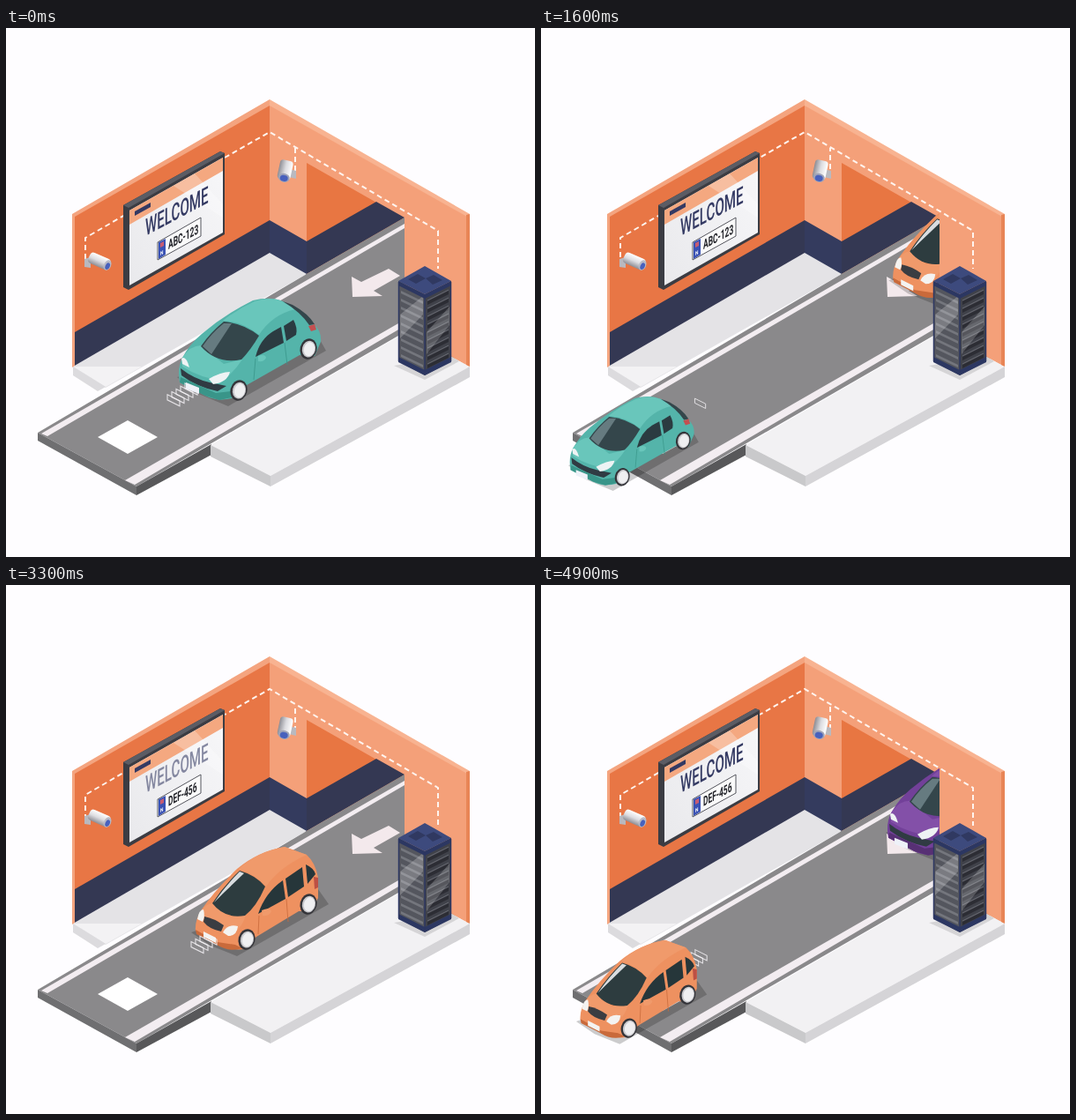
Write an HTML page that moves like this. It is 600x600 px and loops after 5000 ms.

```html
<!DOCTYPE html>
<html lang="en">
<head>
<meta charset="utf-8">
<title>Parking entrance</title>
<style>
  html, body { margin: 0; width: 100%; height: 100%; overflow: hidden; background: #fefdff; }
  svg { display: block; width: 100%; height: 100%; }
  text { font-family: Roboto, "Liberation Sans", sans-serif; }
  .wire { fill: none; stroke: #fff4ee; stroke-width: 2; stroke-dasharray: 6 4; }
</style>
</head>
<body>
<svg viewBox="0 0 600 600">
  <defs>
    <clipPath id="inside"><path d="M0 0H452V600H0Z"/></clipPath>
    <linearGradient id="glass" x1="0" x2="1" y1="1" y2="0"><stop offset="0" stop-color="#e9e9ec"/><stop offset="1" stop-color="#f7f7f9"/></linearGradient>
    <linearGradient id="tube" x1="0" y1="0" x2="0" y2="1"><stop offset="0" stop-color="#fff"/><stop offset=".5" stop-color="#dcdce0"/><stop offset="1" stop-color="#8d8d94"/></linearGradient>
  </defs>

  <g id="walls">
    <path fill="#e87645" d="M78 213L299 87V256L78 384Z"/>
    <path fill="#343853" d="M78 345L299 218V256L78 384Z"/>
    <path fill="#f4a079" d="M299 87L525 213V384L299 256Z"/>
    <path fill="#343b5e" d="M299 218L341 242V280L299 256Z"/>
    <path fill="#e87642" d="M341 153L452 216L341 278Z"/>
    <path fill="#343853" d="M341 242L420 197L452 215L341 279Z"/>
  </g>

  <g id="ground">
    <path fill="#e4e3e6" d="M76 384L299 255L341 279L113 408Z"/>
    <path fill="#f3f2f4" d="M76 384H154L113 407Z"/>
    <path fill="#dcdbde" d="M76 384L113 407L104 412L76 394Z"/>
    <path fill="#8a898b" d="M36 459L341 279L452 215V345L148 520Z"/>
    <path fill="#6f6f71" d="M36 459L148 520V530L36 468Z"/>
    <path fill="#58585a" d="M148 520L233 472V484L148 530Z"/>
    <path fill="#f3edf1" d="M40 460L452 222V227L47 463Z"/>
    <path fill="#f3edf1" d="M135 513L452 331V338L146 518Z"/>
    <path fill="#f2f1f3" d="M232 473L452 346L526 384L300 508Z"/>
    <path fill="#c9c9cb" d="M232 473L300 508V520L232 486Z"/>
    <path fill="#d5d4d7" d="M300 508L526 384V396L300 520Z"/>
    <path fill="#fff" d="M104 464L138 445L172 464L138 483Z"/>
    <path fill="#f3e9ec" d="M393 305L392 282L403 288L434 273L447 281L417 298L427 304Z"/>
  </g>

  <g id="trim">
    <path fill="#f4a47f" d="M75 211L299 81V88L78 214V383L75 385Z"/>
    <path fill="#f8b391" d="M299 81L526 211L523 214L299 88Z"/>
    <path fill="#e88556" d="M522 212L526 211V384L522 382Z"/>
  </g>

  <g id="wires">
    <path class="wire" d="M90 262V238L135 212"/>
    <path class="wire" d="M248 147L299 118L490 230V273"/>
    <path class="wire" d="M328 162V136"/>
  </g>

  <g id="screen">
    <path fill="#3b3c43" d="M133 201L243 140L248 142V234L139 297L133 294Z"/>
    <path fill="#5b5c64" d="M133 201L243 140L248 142L139 204Z"/>
    <path fill="url(#glass)" d="M140 207L246 147V232L140 292Z"/>
    <path fill="#f4a880" d="M140 207L246 147V162L140 223Z"/>
    <path fill="#fff" opacity=".25" d="M190 179L214 165L246 200V215Z"/>
    <path fill="#343a63" d="M146 208L164 198V203L146 213Z"/>
    <text id="hello" transform="matrix(.56 -.297 0 1 158 236)" font-size="27" font-weight="500" fill="#343a63">WELCOME</text>
    <g id="plate">
      <path fill="#fafafa" stroke="#55565e" stroke-width="1" d="M172 243L221 215V236L172 263Z"/>
      <path fill="#3a52b4" d="M173 243L181 239V257L173 262Z"/>
      <path fill="#c65b72" d="M175 244L179 242V247L175 249Z"/>
      <text transform="matrix(.8 -.42 0 1 175 258)" font-size="6" font-weight="700" fill="#fff">N</text>
      <text id="number" transform="matrix(.56 -.297 0 1 184 251)" font-size="15" font-weight="700" fill="#222329"></text>
    </g>
  </g>

  <g id="cameras">
    <path fill="#b9b9bf" d="M89 262L96 260V272L89 271Z"/>
    <g transform="translate(106 265) rotate(24)">
      <rect x="-13" y="-7" width="25" height="13" rx="4" fill="url(#tube)"/>
      <ellipse cx="10" cy="0" rx="4" ry="6" fill="#b8bac6"/>
      <ellipse cx="10.500" cy="1" rx="2.500" ry="4" fill="#4861bd"/>
    </g>
    <path fill="#b9b9bf" d="M321 160L329 162V171L321 169Z"/>
    <g transform="translate(317 162) rotate(102)">
      <rect x="-12" y="-7" width="22" height="15" rx="4" fill="url(#tube)"/>
      <ellipse cx="8" rx="5" ry="6.500" fill="#9da2b8"/>
      <ellipse cx="8.500" rx="3.500" ry="4.500" fill="#4861bd"/>
    </g>
  </g>

  <g id="cars" clip-path="url(#inside)"></g>
  <g id="rack"></g>
</svg>

<script>
const $ = id => document.getElementById(id);
const LOOP = 5000, STEP = 100;
const VX = -108.4, VY = 63.4;
const SHRINK = .6, PIVOT = [277, 385];
const shape = (d, fill, extra = '') => `<path d="${d}" fill="${fill}" ${extra}/>`;
const frac = x => x - Math.floor(x);
const ramp = (t, a, b) => Math.min(1, Math.max(0, (t - a) / (b - a)));

const wheel = (x, y) =>
  `<g transform="translate(${x} ${y}) rotate(14)"><ellipse rx="9.500" ry="11.800" fill="#343439"/>` +
  `<ellipse cx=".5" rx="7.500" ry="9.500" fill="#c9c9cd"/><ellipse cx="1" rx="6" ry="8" fill="#efeff1"/></g>`;

function hatch(c) {
  return shape('M194 396L216 414L252 429L363 366L354 350Z', '#000', 'opacity=".2"') +
    shape('M197 402Q194 386 200 374Q208 359 222 347Q248 325 280 309Q300 304 314 310Q336 320 350 337Q358 344 357 356L350 372L333 371L273 405L256 420Q240 424 226 417Z', c.side) +
    shape('M200 374Q209 360 221 360L247 381L268 376Q258 391 246 400Q220 397 200 384Z', c.top) +
    shape('M246 332Q262 319 282 310Q300 304 313 310L328 319Q302 325 287 348Q268 333 246 332Z', c.top) +
    shape('M221 361Q232 345 247 333Q270 335 287 349Q277 366 267 376Q240 382 221 361Z', '#34464b') +
    shape('M223 361Q233 346 247 335L256 335L233 370Z', '#667b80') +
    shape('M283 373Q288 353 303 344L312 339L315 357Z', '#2b3b41') +
    shape('M315 338L326 331Q331 340 329 348L318 355Z', '#2b3b41') +
    shape('M314 310L325 314Q343 324 350 336L344 337Q334 322 314 310Z', '#34464b') +
    shape('M343 338L350 336L352 342L346 344Z', '#c34f50') +
    shape('M286 372Q294 369 295 374Q293 379 286 378Z', c.top) +
    shape('M316 357L319 382M283 375L281 399', 'none', `stroke="${c.dark}" stroke-width=".8"`) +
    shape('M198 386Q213 398 231 402L250 406L240 412Q216 407 199 394Z', '#303b43') +
    shape('M199 375Q204 371 208 385L200 381Z', '#eef3f4') +
    shape('M230 398Q244 390 254 390Q251 402 235 404Z', '#eef3f4') +
    shape('M197 402L226 417L242 422L256 419L255 412L238 414L198 396Z', c.dark) +
    shape('M204 402L219 408V415L204 409Z', '#eef1f8') +
    wheel(264, 411) + wheel(343, 364);
}

function van(c) {
  return shape('M210 394L232 409L262 421L366 362L354 345Z', '#000', 'opacity=".2"') +
    shape('M215 392Q214 380 222 368Q236 347 262 322Q286 302 316 297L341 306Q351 315 354 332L354 355L345 370L332 370L284 399L270 413Q255 415 240 407Z', c.side) +
    shape('M221 370Q227 361 235 361L253 376L272 374Q269 387 258 395Q238 393 221 378Z', c.top) +
    shape('M264 322Q286 302 316 297L341 306Q310 320 295 342Q282 328 264 322Z', c.top) +
    shape('M234 361Q247 341 265 324Q283 329 294 342Q284 365 271 375Q248 379 234 361Z', '#2d3c3f') +
    shape('M236 360Q248 342 265 325L270 327L246 350Z', '#d9dde0') +
    shape('M286 373Q294 349 314 335L317 356Z', '#26363a') +
    shape('M317 333L336 320L338 342L320 354Z', '#26363a') +
    shape('M340 317Q349 321 351 328L342 339Z', '#26363a') +
    shape('M349 331L354 332V343L350 345Z', '#bd5044') +
    shape('M290 369Q299 365 301 370Q299 376 291 375Z', c.top) +
    shape('M318 356L320 382M287 375L286 396', 'none', `stroke="${c.dark}" stroke-width=".8"`) +
    shape('M225 376Q236 378 247 386L244 393Q230 390 224 382Z', '#3a3d42') +
    shape('M217 379Q219 368 224 368Q226 376 223 382Z', '#f4f3f1') +
    shape('M246 394Q251 384 263 387Q262 398 252 398Z', '#f4f3f1') +
    shape('M215 391L240 405L260 408L268 412Q253 417 239 408L216 396Z', c.dark) +
    shape('M224 393L238 400V406L224 399Z', '#f4f3f1') +
    wheel(273, 402) + wheel(343, 362);
}

// Five outlines of a number plate stepping away from the car.
function pulses(x, y, dir) {
  let s = '';
  for (let k = 0; k < 5; k++)
    s += shape('M0 0L14 7V13L0 6Z', 'none',
      `stroke="#f4f2f6" stroke-width="1.100" transform="translate(${x + dir * 5 * k} ${y - dir * 3.2 * k})"`);
  return s;
}

const teal = { top: '#69c6bb', side: '#54b4aa', dark: '#399589' };
const orange = { top: '#f09a6b', side: '#ee9160', dark: '#c96a3b' };
const purple = { top: '#8350a8', side: '#724099', dark: '#573074' };
const cars = [
  { at: 6.717, leave: 1.3, draw: hatch, paint: purple, front: [203, 403], back: [338, 322], f0: 0, b0: 0, rate: 1.4 },
  { at: 3.3, leave: 1.38, draw: van, paint: orange, front: [225, 395], back: [337, 318], f0: .33, b0: .05 - .7 * 1.44, rate: 1.44 },
  { at: 0, leave: 1.3, draw: hatch, paint: teal, front: [203, 403], back: [338, 322], f0: .45, b0: .25 - .9 * .9, rate: .9 }
];

for (const car of cars) {
  const g = document.createElementNS('http://www.w3.org/2000/svg', 'g');
  g.innerHTML = `<g>${pulses(...car.back, 1)}</g><g>${car.draw(car.paint)}</g><g>${pulses(...car.front, -1)}</g>`;
  $('cars').append(g);
  car.node = g;
}

function rack() {
  let s = shape('M440 383L475 399L514 378L505 372Z', '#000', 'opacity=".12"') +
    shape('M445 287L475 302V394L445 378Z', '#54565e') +
    shape('M475 302L505 287V378L475 394Z', '#40424a');
  for (let i = 0; i < 9; i++) {
    const y = 298 + i * 9;
    s += shape(`M448 ${y}L473 ${y + 12}V${y + 15}L448 ${y + 3}Z`, '#74767d') +
      shape(`M478 ${y + 12}L502 ${y}V${y + 4}L478 ${y + 16}Z`, '#2c2d34') +
      shape(`M478 ${y + 11}L502 ${y - 1}`, 'none', 'stroke="#686a72" stroke-width="1"');
  }
  return s + shape('M447 325L473 304V325L447 352Z', '#fff', 'opacity=".22"') +
    shape('M477 345L503 316V337L477 370Z', '#fff', 'opacity=".2"') +
    shape('M445 287L475 270L505 287L475 302Z', '#3d4a7d') +
    shape('M456 285L467 279L476 284L465 290ZM476 284L485 280L495 286L484 291Z', '#303961') +
    shape('M445 287L475 302L505 287V292L475 307L445 292Z', '#2c3762') +
    shape('M445 373L475 388L505 373V379L475 394L445 379Z', '#2c3762') +
    shape('M445.500 288V378M475 303V393M504.500 288V378', 'none', 'stroke="#2c3762" stroke-width="1.500"');
}
$('rack').innerHTML = rack();

function showPulses(group, p, on) {
  [...group.children].forEach((el, k) => {
    el.style.opacity = on && p > .1 * k && p < .5 + .1 * k ? .85 : 0;
  });
}

function render(ms) {
  const t = Math.floor((ms % LOOP) / STEP) * STEP / 1000;
  for (const car of cars) {
    const tau = t - car.at;
    const size = 1 - ramp(tau, car.leave, car.leave + SHRINK) ** 3;
    const [px, py] = PIVOT;
    const [back, , front] = car.node.children;
    car.node.setAttribute('transform',
      `translate(${tau * VX + px} ${tau * VY + py}) scale(${size}) translate(${-px} ${-py})`);
    showPulses(front, frac(car.f0 + 1.4 * tau), tau > -.5 && tau < 1.2);
    showPulses(back, frac(car.b0 + car.rate * tau), tau > .5);
  }
  const bye = 1 - ramp(t, 1.8, 2);
  $('hello').style.opacity = Math.max(bye, ramp(t, 3.1, 3.45));
  $('plate').style.opacity = Math.max(bye, ramp(t, 2.9, 3.1));
  $('number').textContent = t < 2.5 ? 'ABC-123' : 'DEF-456';
  for (const w of $('wires').children) w.style.strokeDashoffset = -20 * t;
}

const start = performance.now();
function tick() {
  render(performance.now() - start);
  requestAnimationFrame(tick);
}
tick();
</script>
</body>
</html>
```
